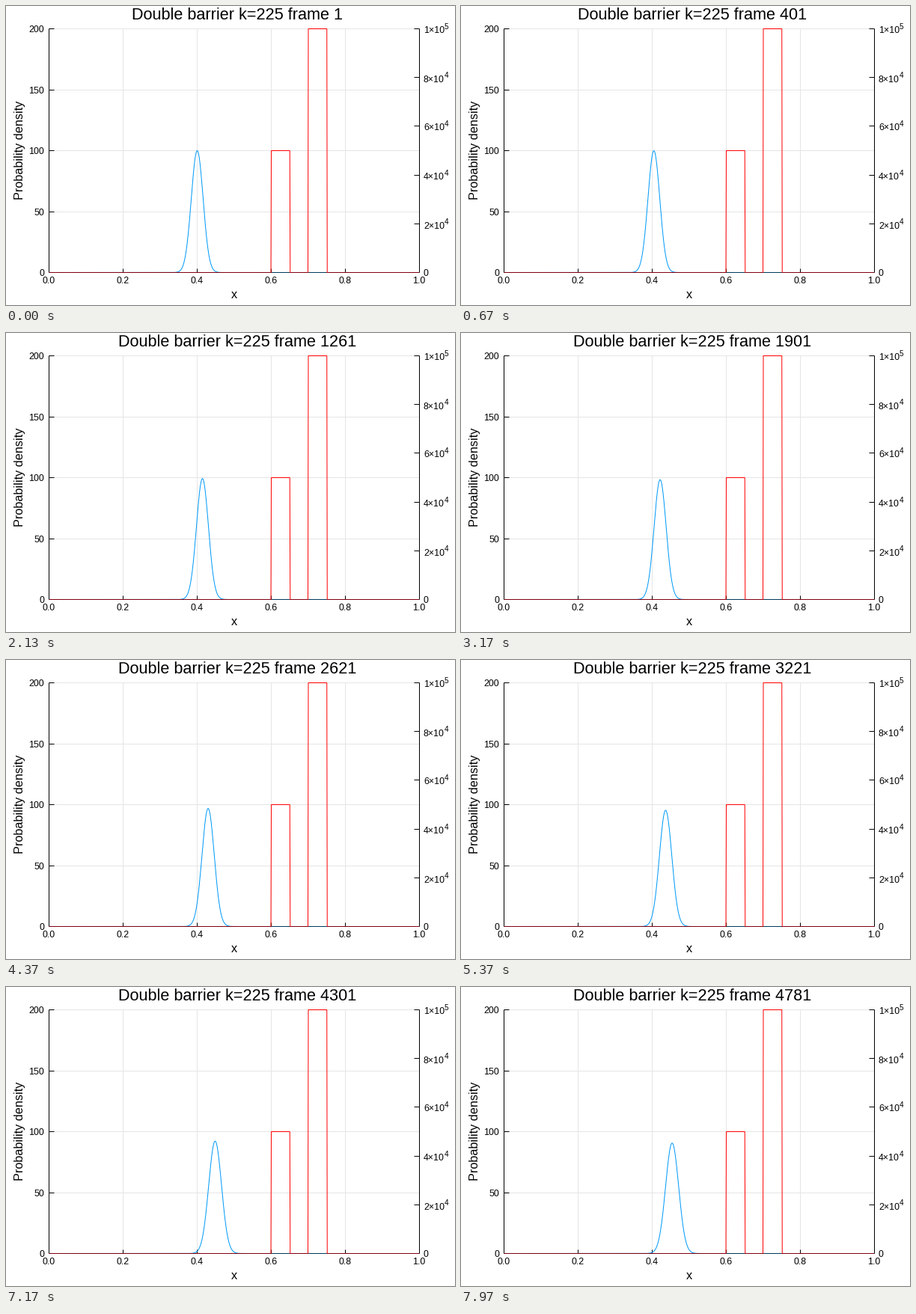
A matplotlib script for the animation above (8000 ms loop, 600 px wide and 400 px high).

```python
import math
import numpy as np
import matplotlib.pyplot as plt
from matplotlib.animation import FuncAnimation

W, H, DPI = 600, 400, 100
PX = 72 / DPI                       # points per pixel
LEFT, RIGHT, TOP, BOTTOM = 57.5, 552.5, 30.5, 356.5
FRAMES, LOOP_MS = 240, 8000
K, SIGMA, X0, DT = 225, 0.016, 0.4, 1e-6
TITLE, GUIDE, TICK, POWER = 21.6, 16.3, 12.4, 10    # text sizes in pixels

RED, BLUE, GRID = "#ff0000", "#009af9", "#e5e5e5"
BASE, BASE_GAP = "#800010", "#003a5c"

plt.rcParams["font.family"] = "Liberation Sans"

fig = plt.figure(figsize=(W / DPI, H / DPI), dpi=DPI, facecolor="white")
ax = fig.add_axes([0, 0, 1, 1])
ax.set_xlim(0, W)
ax.set_ylim(H, 0)
ax.axis("off")


def px(x):
    return LEFT + (RIGHT - LEFT) * x


def py(p):
    return BOTTOM - (BOTTOM - TOP) * p / 200


def crisp(v):
    """Centre of the pixel that holds v."""
    return math.floor(v) + 0.5


def line(xs, ys, color="black", z=3):
    return ax.plot(xs, ys, color=color, lw=PX, zorder=z, snap=False,
                   solid_capstyle="butt", solid_joinstyle="miter")[0]


def label(x, y, s, size, **kw):
    return ax.text(x, y, s, fontsize=size * PX, color="black",
                   va="baseline", **kw)


def draw_axes():
    for x in (0.2, 0.4, 0.6, 0.8):
        cx = crisp(px(x))
        line([cx, cx], [TOP, BOTTOM], GRID, 1)
        line([cx, cx], [BOTTOM - 5, BOTTOM])
    for x in (0.0, 0.2, 0.4, 0.6, 0.8, 1.0):
        label(px(x) - 0.5, 371, f"{x:.1f}", TICK, ha="center")

    for p in (0, 50, 100, 150, 200):
        y = crisp(py(p))
        if p:
            line([LEFT, RIGHT], [y, y], GRID, 1)
            line([LEFT, LEFT + 7], [y, y])
        label(51, y + 4.5, str(p), TICK, ha="right")

    for v in (0, 2, 4, 6, 8, 10):
        y = crisp(py(20 * v))
        if v == 0:
            label(558, y + 4.5, "0", TICK)
            continue
        line([RIGHT - 7, RIGHT], [y, y])
        mantissa, power = (1, 5) if v == 10 else (v, 4)
        label(558, y + 6, f"{mantissa}×10", TICK)
        label(586, y + 0.5, str(power), POWER)

    line([LEFT, LEFT], [TOP, BOTTOM + 0.5])
    line([RIGHT, RIGHT], [TOP, BOTTOM + 0.5])
    label(305, 391, "x", GUIDE, ha="center")
    label(23.5, 193, "Probability density", GUIDE, ha="center",
          rotation=90, rotation_mode="anchor")


def draw_barriers():
    line([LEFT, RIGHT], [BOTTOM, BOTTOM], BASE, 5)
    for x1, x2, p in ((0.6, 0.65, 100), (0.7, 0.75, 200)):
        a, b, y = px(x1), px(x2), py(p)
        line([a, b], [BOTTOM, BOTTOM], BASE_GAP, 6)
        line([a - 0.5, a, b, b + 0.5], [BOTTOM, y, y, BOTTOM], RED, 7)


draw_axes()
draw_barriers()

xs = np.linspace(0, 1, 1501)
wave = line(px(xs), py(0 * xs), BLUE, 4)
title = label(168, 18, "", TITLE, ha="left")


def density(t):
    """Free Gaussian packet: drifts at speed K and spreads."""
    spread = 1 + (t / (2 * SIGMA**2)) ** 2
    return 100 / np.sqrt(spread) * np.exp(
        -(xs - X0 - K * t) ** 2 / (2 * SIGMA**2 * spread))


def update(i):
    step = str(1 + 20 * i)
    wave.set_ydata(py(density(i * DT)))
    title.set_text(f"Double barrier k=225 frame {step}")
    title.set_x(174 - 6 * len(step))
    return wave, title


anim = FuncAnimation(fig, update, frames=FRAMES, interval=LOOP_MS / FRAMES,
                     init_func=lambda: update(0), repeat=True, repeat_delay=0)
plt.show()
```
